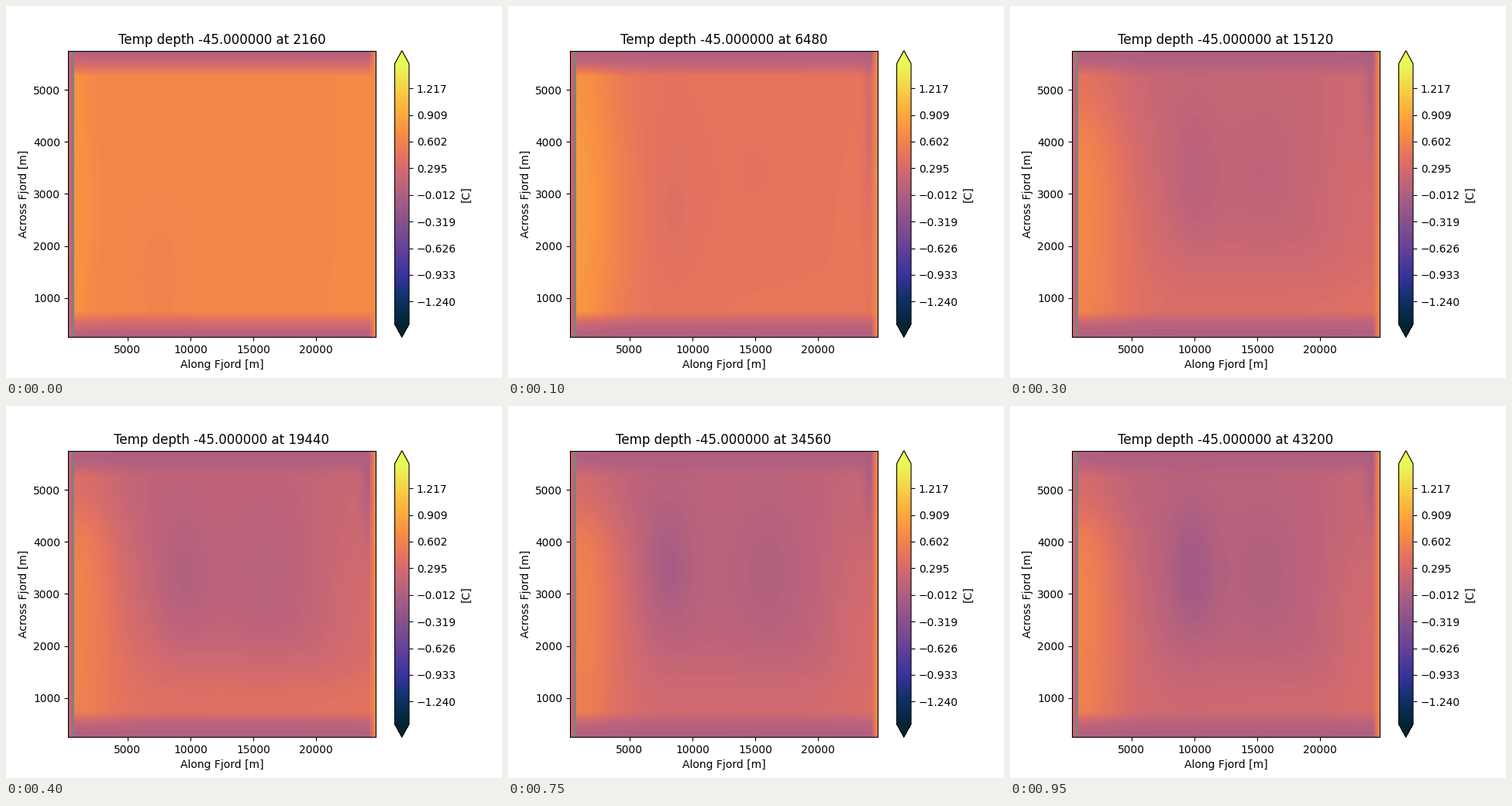
Recreate the animation shown at these times as a matplotlib script. Size 640 by 480 pixels, loop 1 s.

```python
import numpy as np
import matplotlib.pyplot as plt
from matplotlib.animation import FuncAnimation
from matplotlib.colors import LinearSegmentedColormap

FRAMES, INTERVAL, STEP_SECONDS = 20, 50, 2160
WALL, OPEN_SEA, LEFT_STRIP = -0.02, 0.66, 0.17

THERMAL = LinearSegmentedColormap.from_list("thermal", [
    "#032333", "#0d3064", "#35329b", "#5d3e99", "#7e4d8f", "#9e5987",
    "#c16479", "#e17161", "#f68b45", "#fbad3c", "#f6d346", "#e7fa5a"])
LEVELS = np.linspace(-1.5, 1.5, 128)

# Positions in km; the missing column leaves the grey glacier face uncovered.
x = np.concatenate([[.25, .5, .625], np.arange(.75, 24.76, .25)])
y = np.arange(.25, 5.76, .0625)
X, Y = np.meshgrid(x, y)


def bell(d, width):
    return np.exp(-(d / width) ** 2)


def eddy(cx, cy, width, height):
    return bell(X - cx, width) * bell(Y - cy, height)


def interior(i):
    """Cooling water with warm margins and two drifting cold eddies."""
    grown = 1 - bell(i, 6)
    field = .09 + .55 * np.exp(-(i / 3.7) ** 1.3) + .001 * (X - 12)

    low = .14 * grown + .16 * bell(i - 9.5, 4)
    low = low * bell(Y - .75, 1 + .9 * bell(X, 8))
    right = .18 * grown * bell(X - 24, 3.5) * (.4 + .6 * bell(Y - 2, 2))
    field += np.hypot(low, right)

    swing = np.cos(2 * np.pi * (i - 6) / 14)
    field -= (.05 + .007 * i) * eddy(8.7 + 1.2 * swing,
                                     3.4 - 2 * np.exp(-i / 2), 2.1, 1.4)
    field -= .08 * grown * eddy(15.6 + 3.2 * bell(i - 11.5, 2.5), 3.4, 3, 1.4)
    field -= .2 * (1 - np.exp(-i)) * eddy(24.1, 5.3, .5,
                                          .9 + 5 * np.exp(-i / 2.5))

    # Inflow spreads from the left, then retreats from the upper shore.
    hot = .6 + .2 * bell(i - 2, 3)
    reach = 3.7 * (1 - .6 * np.exp(-i / 2)) + 1.6 * bell(i - 4, 2)
    upper = 1 / (1 + np.exp((4.5 - Y) / .25))
    middle = bell(Y - 2.8, 1.8)
    share = (.85 + .15 * middle) * (1 - .6 * grown * upper)
    share = share * bell(X - .75, reach * (.88 + .18 * middle))
    return field + (hot - field) * share


def temperature(i):
    shore = .25 + .15 * np.exp(-i)
    inside = np.interp(Y, [.25, .5, .75, 5.25, 5.5, 5.75],
                       [0, shore, 1, 1, shore, 0])
    field = WALL + (interior(i) - WALL) * inside
    field += (OPEN_SEA - field) * np.clip((X - 24.25) / .5, 0, 1)
    field[:, :2] = LEFT_STRIP
    field[:, 2] = np.nan
    return np.ma.masked_invalid(field)


def draw_field(i):
    return ax.contourf(X * 1000, Y * 1000, temperature(i), LEVELS,
                       cmap=THERMAL, extend="both")


fig, ax = plt.subplots(figsize=(6.4, 4.8), dpi=100)
ax.set_facecolor("gray")
ax.set_xlabel("Along Fjord [m]")
ax.set_ylabel("Across Fjord [m]")
title = ax.set_title("")
contours = draw_field(0)
fig.colorbar(contours, ax=ax, ticks=LEVELS[11::13], label="[C]")


def update(i):
    global contours
    contours.remove()
    contours = draw_field(i)
    title.set_text(f"Temp depth -45.000000 at {STEP_SECONDS * (i + 1)}")
    return contours, title


animation = FuncAnimation(fig, update, frames=FRAMES, interval=INTERVAL,
                          repeat=True, repeat_delay=0, blit=False)
plt.show()
```
